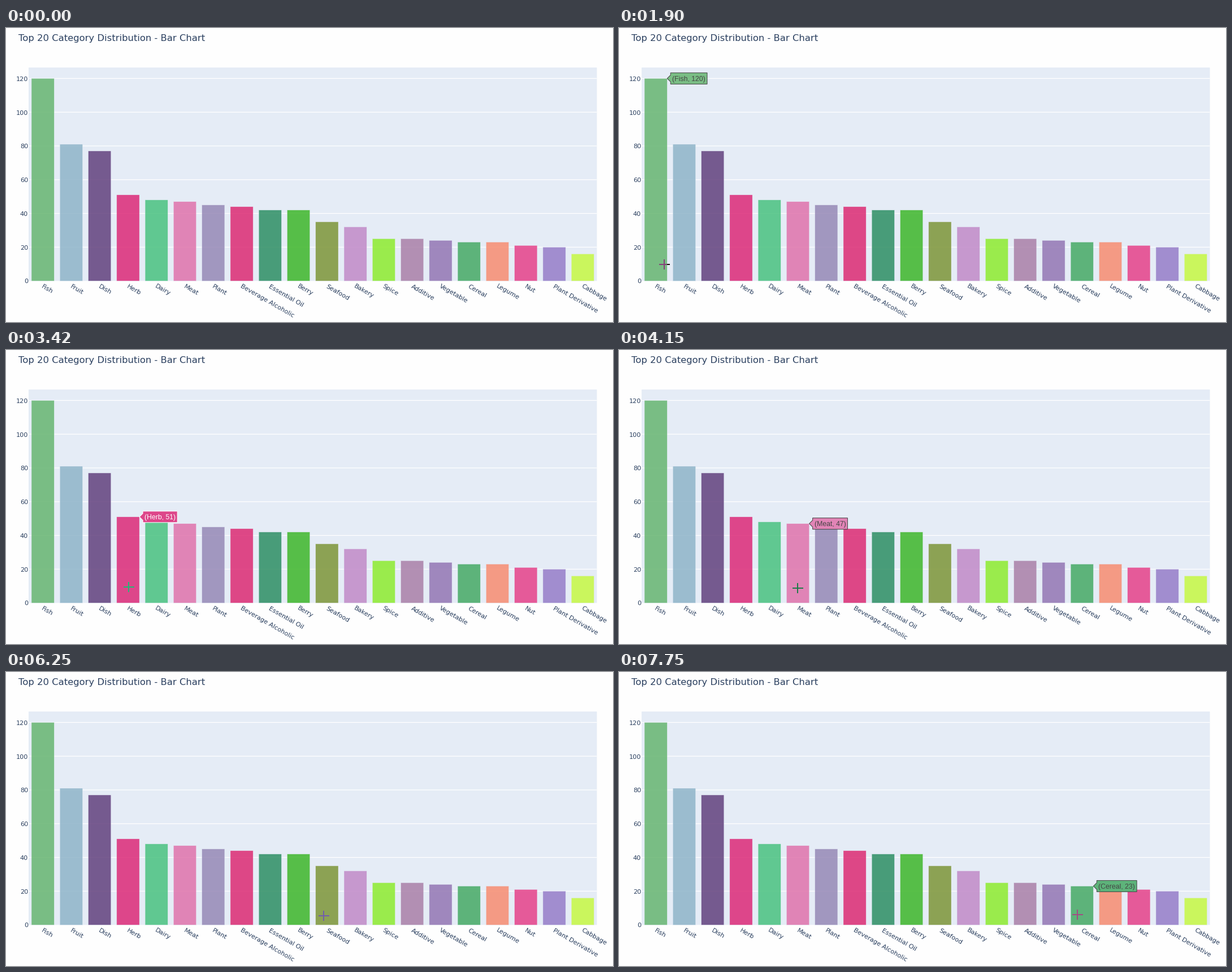
Animation, 1074 px wide and 521 px high, one loop 8 s. Source, as a matplotlib script:

```python
import numpy as np
import matplotlib.pyplot as plt
from matplotlib.animation import FuncAnimation
from matplotlib.collections import LineCollection
from matplotlib.colors import to_rgb
from matplotlib.patches import Polygon, Rectangle

W, H, DPI = 1074, 521, 100
LOOP, STEP = 8000, 40
LEFT, RIGHT, TOP, BASE = 40, 1045.5, 70, 448.2
UNIT = 2.99                      # pixels per count
SLOT = (RIGHT - LEFT) / 20
BAR_W = 0.8 * SLOT
PLOT_BG, INK = "#e5ecf6", "#2a3f5f"
OPACITY = 0.85
HOVER_LAG = 110
ENTER = 340

BARS = [
    ("Fish", 120, "#79bd84"), ("Fruit", 81, "#9bbcd0"),
    ("Dish", 77, "#765a8f"), ("Herb", 51, "#dd468a"),
    ("Dairy", 48, "#60c891"), ("Meat", 47, "#e184b6"),
    ("Plant", 45, "#a297c0"), ("Beverage Alcoholic", 44, "#dd4787"),
    ("Essential Oil", 42, "#499c79"), ("Berry", 42, "#56be48"),
    ("Seafood", 35, "#8da254"), ("Bakery", 32, "#c698cf"),
    ("Spice", 25, "#9aeb4c"), ("Additive", 25, "#b28fb4"),
    ("Vegetable", 24, "#9f88bd"), ("Cereal", 23, "#5db37a"),
    ("Legume", 23, "#f49a84"), ("Nut", 21, "#e55b99"),
    ("Plant Derivative", 20, "#a28dd0"), ("Cabbage", 16, "#cbf65d"),
]

# pointer turning points: time in ms, x, y
PATH = np.array([
    (340, 729, 508), (460, 480, 476), (590, 266, 498), (820, 266, 498),
    (1110, 109, 457), (1600, 60, 420), (2610, 133, 418), (3420, 219, 420),
    (4840, 415, 424), (5380, 486, 425), (5700, 486, 425), (6250, 563, 432),
    (7640, 811, 430),
])

ARROW = np.array([(0, 0), (0, 17), (4, 13), (6.5, 19), (9, 18), (6.5, 12), (12, 12)])
HALF = np.array([(-11, 0), (-5, -5.5), (-5, -2), (5, -2), (5, -5.5)])
RESIZE = np.vstack([HALF, -HALF])


def px(size):
    return size * 72 / DPI


def y_of(count):
    return BASE - count * UNIT


def bar_left(i):
    return LEFT + SLOT * i + (SLOT - BAR_W) / 2


def pointer(t):
    return tuple(np.interp(t, PATH[:, 0], PATH[:, k]) for k in (1, 2))


def bar_at(x, y):
    i = int((x - LEFT) // SLOT)
    if not 0 <= i < len(BARS):
        return None
    inside = bar_left(i) <= x <= bar_left(i) + BAR_W
    return i if inside and y_of(BARS[i][1]) <= y < BASE else None


def inverse_at(x, y):
    i = bar_at(x, y)
    rgb = to_rgb(PLOT_BG if i is None else BARS[i][2])
    return tuple(1 - c for c in rgb)


def contrast(color):
    dark = np.dot(to_rgb(color), (0.299, 0.587, 0.114)) < 128 / 255
    return "white" if dark else "#444444"


def unblend(color):
    """Colour that gives `color` when laid over the plot background."""
    bg = np.array(to_rgb(PLOT_BG))
    return np.clip((np.array(to_rgb(color)) - (1 - OPACITY) * bg) / OPACITY, 0, 1)


fig = plt.figure(figsize=(W / DPI, H / DPI), dpi=DPI, facecolor="#fefefe")
ax = fig.add_axes([0, 0, 1, 1])
ax.set_xlim(0, W)
ax.set_ylim(H, 0)
ax.axis("off")


def label(x, y, text, size=11.2, **kw):
    kw = {"color": INK, "family": "DejaVu Sans", "va": "baseline", **kw}
    return ax.text(x, y, text, fontsize=px(size), **kw)


def rect(x, y, w, h, **kw):
    ax.add_patch(Rectangle((x, y), w, h, snap=False, **kw))


def draw_chart():
    rect(LEFT, TOP, RIGHT - LEFT, BASE - TOP, fc=PLOT_BG, lw=0)
    ax.plot([0, W], [520.5, 520.5], color="#e6e6e6", lw=px(1))
    label(22, 22.8, "Top 20 Category Distribution - Bar Chart", 16.35)
    for count in range(0, 121, 20):
        y = y_of(count)
        if count:
            ax.plot([LEFT, RIGHT], [y, y], color="white", lw=px(1.3),
                    solid_capstyle="butt", snap=False, zorder=1)
        label(39, y + 4.3, str(count), ha="right")
    for i, (name, count, color) in enumerate(BARS):
        x, y = bar_left(i), y_of(count)
        rect(x, y, BAR_W, BASE - y, fc=unblend(color), ec=PLOT_BG,
             lw=px(0.5), alpha=OPACITY, zorder=2)
        label(x + BAR_W / 2 - 3, 459.7, name, rotation=-30, rotation_mode="anchor")


draw_chart()
tip_box = ax.add_patch(Polygon([(0, 0)] * 3, lw=px(1), zorder=5))
tip_text = label(0, 0, "", 12.3, family="Liberation Sans", zorder=6)
hand = ax.add_patch(Polygon(ARROW, fc="white", ec="#333333", lw=px(1), zorder=8))
cross = LineCollection([], linewidths=px(2), antialiaseds=False,
                       capstyle="butt", zorder=8)
ax.add_collection(cross)


def show_tip(i):
    tip_box.set_visible(i is not None)
    tip_text.set_visible(i is not None)
    if i is None:
        return
    name, count, color = BARS[i]
    x, y = bar_left(i) + BAR_W, y_of(count)
    tip_text.set_text(f"({name}, {count})")
    tip_text.set_position((x + 9, y + 4.6))
    tip_text.set_color(contrast(color))
    inner = x + 6
    outer = inner + tip_text.get_window_extent().width + 6
    tip_box.set_xy([(x, y), (inner, y + 6), (inner, y + 10), (outer, y + 10),
                    (outer, y - 10), (inner, y - 10), (inner, y - 6)])
    tip_box.set_facecolor(color)
    tip_box.set_edgecolor(contrast(color))


def show_pointer(t):
    x, y = (round(v) for v in pointer(t))
    in_plot = y < BASE
    cross.set_visible(t >= ENTER and in_plot)
    hand.set_visible(t >= ENTER and not in_plot)
    if in_plot:
        xs = range(x - 9, x + 10)
        segments = [[(a, y), (a + 1, y)] for a in xs]
        colors = [inverse_at(a + 0.5, y) for a in xs]
        cross.set_segments(segments + [[(x, y - 9), (x, y + 9)]])
        cross.set_color(colors + [inverse_at(x, y)])
    else:
        shape = RESIZE if y < BASE + 20 else ARROW
        hand.set_xy(shape + (x, y))


def update(n):
    t = n * STEP
    show_pointer(t)
    show_tip(bar_at(*pointer(t - HOVER_LAG)))
    return tip_box, tip_text, hand, cross


anim = FuncAnimation(fig, update, frames=LOOP // STEP, interval=STEP,
                     repeat=True, repeat_delay=0, blit=False)
plt.show()
```
